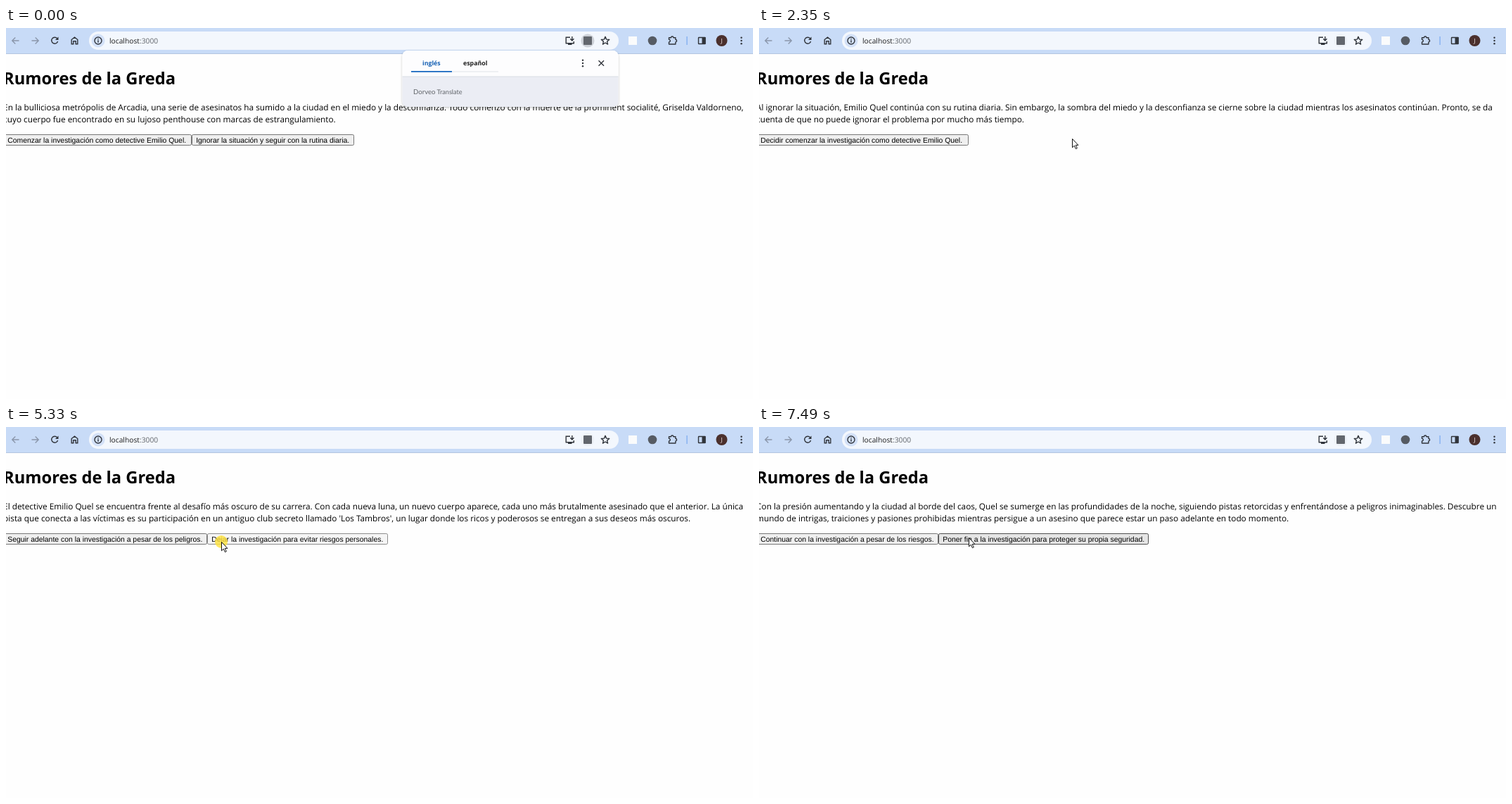
Write an HTML page that moves like this. It is 1062 px wide and 527 px high and loops after 8 s.

```html
<!DOCTYPE html>
<html lang="es">
<head>
<meta charset="utf-8">
<title>Rumores de la Greda</title>
<style>
  html, body { margin: 0; width: 100%; height: 100%; overflow: hidden; background: #fefefe; }
  svg { display: block; width: 1062px; height: 527px; }
  text { font-family: "Open Sans", "Noto Sans", sans-serif; text-rendering: geometricPrecision; }
  .h1 { font-size: 23.7px; font-weight: 700; }
  .p { font-size: 11.8px; }
  .url { font-size: 10.25px; fill: #1f1f1f; }
  .tab { font-size: 8.8px; font-weight: 700; fill: #1f1f1f; }
  .brand { font-family: Lato, sans-serif; fill: #5f6368; }
  .btn text { font-family: "Liberation Sans", Arial, sans-serif; font-size: 10.42px; }
  .btn rect { fill: #efefef; stroke: #767676; }
  .btn.hover rect { fill: #e5e5e5; stroke: #4f4f4f; }
  .btn.active rect { fill: #f5f5f5; stroke: #8d8d8d; }
  .line { fill: none; stroke: #30343b; stroke-width: 1.4; }
  .dim { stroke: #8b97ab; }
  .ink { fill: #30343b; }
</style>
</head>
<body>
<svg viewBox="0 0 1062 527">
  <defs>
    <filter id="shadow" x="-10%" y="-20%" width="120%" height="150%">
      <feDropShadow dx="0" dy="1" stdDeviation="1.6" flood-color="#3c4043" flood-opacity=".35"/>
    </filter>
    <clipPath id="card"><rect x="563.5" y="32" width="307" height="80" rx="8"/></clipPath>
  </defs>

  <rect width="1062" height="527" fill="#fefefe"/>

  <g id="page">
    <text class="h1" x="-3.9" y="80.3">Rumores de la Greda</text>
    <text class="p" id="line1" x="-3.9" y="117"></text>
    <text class="p" id="line2" x="-3.9" y="133.5"></text>
    <g class="btn"><rect y="151.5" height="15" rx="1.8"/><text y="162.7"></text></g>
    <g class="btn"><rect y="151.5" height="15" rx="1.8"/><text y="162.7"></text></g>
  </g>

  <g id="toolbar">
    <rect width="1062" height="36" fill="#c8dbf7"/>
    <rect y="36" width="1062" height="1" fill="#b3c5e0"/>
    <rect x="118" y="5" width="753" height="26" rx="13" fill="#f3f7fd"/>
    <path class="line dim" d="M18.5 18H9M13.3 13.5L8.8 18L13.3 22.5"/>
    <path class="line dim" d="M36.500 18H46M41.700 13.500L46.200 18L41.700 22.500"/>
    <path class="line" d="M72.700 14.800A4.500 4.500 0 1 0 73.600 19"/>
    <path class="ink" d="M74.500 12.500V17H70Z"/>
    <path class="line" d="M93.200 22.700V16.500L97.500 13.200L101.800 16.500V22.700H99.200V18.800H95.800V22.700Z"/>
    <circle cx="131" cy="18" r="9.500" fill="#d3e1f8"/>
    <circle class="line" cx="131" cy="18" r="5"/>
    <path class="line" d="M131 17.300V20.800M131 15V16.300"/>
    <text class="url" x="147" y="21.800">localhost<tspan fill="#5f6368">:3000</tspan></text>

    <path class="line" d="M802 13.200H796.200V21.700H807.300V19M799 23.200H804.500M804.800 12V17.500M802.200 15.300L804.800 17.900L807.400 15.300"/>
    <circle id="chip" cx="827" cy="18" r="9.500" fill="#cdd1d8"/>
    <rect x="821" y="12" width="12" height="12" rx="1" fill="#62666d"/>
    <path class="line" id="star" stroke-linejoin="round"/>
    <rect x="885" y="12" width="12" height="12" fill="#fafbfc"/>
    <circle cx="919" cy="18" r="6.300" fill="#565b63"/>
    <path class="line" stroke-linejoin="round" d="M942.500 13.700H945.500A1.700 1.700 0 0 1 948.900 13.700H951.900V16.500A1.700 1.700 0 0 1 951.900 19.900V23H942.500V20A1.800 1.800 0 0 0 942.500 16.400Z"/>
    <rect x="967.500" y="12" width="1.200" height="12" fill="#78aaf0"/>
    <rect class="line" x="984.500" y="13.500" width="9.500" height="9" rx=".5"/>
    <rect class="ink" x="989.500" y="13" width="5" height="10"/>
    <circle cx="1017.500" cy="18" r="8" fill="#4b302d"/>
    <text x="1017.500" y="21" font-size="8.500" fill="#eee5e2" text-anchor="middle">J</text>
    <g class="ink"><circle cx="1045.500" cy="13.700" r="1.200"/><circle cx="1045.500" cy="18" r="1.200"/><circle cx="1045.500" cy="22.300" r="1.200"/></g>
  </g>

  <g id="popup">
    <rect x="563.5" y="32" width="307" height="80" rx="8" fill="#fff" filter="url(#shadow)"/>
    <g clip-path="url(#card)">
      <rect x="563" y="32" width="308" height="37" fill="#fdfdfe"/>
      <rect x="563" y="69" width="308" height="43" fill="#ebedf4"/>
      <rect x="563" y="68.500" width="308" height="1" fill="#d9dde5"/>
    </g>
    <rect x="634" y="61.500" width="66" height="1" fill="#dfe3ea"/>
    <rect x="576" y="61" width="58" height="1.800" fill="#1b6ac0"/>
    <text class="tab" x="592" y="53" style="fill:#1460b4">inglés</text>
    <text class="tab" x="650" y="53">español</text>
    <g class="ink"><circle cx="820" cy="45.800" r="1.200"/><circle cx="820" cy="50" r="1.200"/><circle cx="820" cy="54.200" r="1.200"/></g>
    <path class="line" d="M842.500 46.200L850 53.700M850 46.200L842.500 53.700"/>
    <text class="brand" x="579" y="93.500" font-size="9.600">Dorveo</text>
    <text class="brand" x="612.500" y="93.500" font-size="9.200">Translate</text>
  </g>

  <circle id="halo" r="9" fill="#ffe23c" fill-opacity=".8"/>
  <path id="cursor" fill="#fff" stroke="#111" stroke-width="1" stroke-linejoin="round"
        d="M.5 .5V12.800L3.300 10.200L5.400 14.700L7.300 13.800L5.200 9.400H8.900Z"/>
</svg>

<script>
const LOOP = 8000, PRESS = 70;

// start time, two text lines, buttons as [label, right edge]
const scenes = [
  { at: 0,
    lines: ["En la bulliciosa metrópolis de Arcadia, una serie de asesinatos ha sumido a la ciudad en el miedo y la desconfianza. Todo comenzó con la muerte de la prominent socialité, Griselda Valdorneno,",
            "cuyo cuerpo fue encontrado en su lujoso penthouse con marcas de estrangulamiento."],
    buttons: [["Comenzar la investigación como detective Emilio Quel.", 264], ["Ignorar la situación y seguir con la rutina diaria.", 495]] },
  { at: 1990,
    lines: ["Al ignorar la situación, Emilio Quel continúa con su rutina diaria. Sin embargo, la sombra del miedo y la desconfianza se cierne sobre la ciudad mientras los asesinatos continúan. Pronto, se da",
            "cuenta de que no puede ignorar el problema por mucho más tiempo."],
    buttons: [["Decidir comenzar la investigación como detective Emilio Quel.", 298]] },
  { at: 3600,
    lines: ["El detective Emilio Quel se encuentra frente al desafío más oscuro de su carrera. Con cada nueva luna, un nuevo cuerpo aparece, cada uno más brutalmente asesinado que el anterior. La única",
            "pista que conecta a las víctimas es su participación en un antiguo club secreto llamado 'Los Tambros', un lugar donde los ricos y poderosos se entregan a sus deseos más oscuros."],
    buttons: [["Seguir adelante con la investigación a pesar de los peligros.", 286], ["Dejar la investigación para evitar riesgos personales.", 543]] },
  { at: 5400,
    lines: ["Al optar por alejarse de la investigación, Emilio Quel elige poner su seguridad por encima de la búsqueda de la verdad. Sin embargo, el peso de la culpa y la responsabilidad lo persigue mientras",
            "los asesinatos continúan y la ciudad se sumerge más profundamente en la oscuridad."],
    buttons: [["Volver a la investigación y enfrentar los peligros.", 231]] },
  { at: 6750,
    lines: ["Con la presión aumentando y la ciudad al borde del caos, Quel se sumerge en las profundidades de la noche, siguiendo pistas retorcidas y enfrentándose a peligros inimaginables. Descubre un",
            "mundo de intrigas, traiciones y pasiones prohibidas mientras persigue a un asesino que parece estar un paso adelante en todo momento."],
    buttons: [["Continuar con la investigación a pesar de los riesgos.", 255], ["Poner fin a la investigación para proteger su propia seguridad.", 554]] }
];

// pointer moves: first step, last step, step count, destination
const start = [1158, 616];
const moves = [
  [110, 590, 8, 539, 171],
  [790, 790, 1, 538, 170],
  [1450, 1450, 1, 493, 170],
  [1520, 1720, 4, 451, 157],
  [2350, 2350, 1, 445, 157],
  [2420, 2940, 9, 250, 157],
  [4000, 4070, 2, 306, 163],
  [5670, 6150, 8, 207, 157],
  [7080, 7490, 7, 298, 157]
];

const $ = id => document.getElementById(id);
const buttons = [...document.querySelectorAll(".btn")];
const easeOut = p => 1 - (1 - p) ** 2;

$("star").setAttribute("d", "M" + Array.from({ length: 10 }, (_, i) => {
  const r = i % 2 ? 2.7 : 6, a = i * Math.PI / 5;
  return (852 + r * Math.sin(a)).toFixed(2) + " " + (18.3 - r * Math.cos(a)).toFixed(2);
}).join("L") + "Z");

function pointer(t) {
  let [x, y] = start;
  for (const [from, to, n, tx, ty] of moves) {
    if (t < from) break;
    const gap = (to - from) / (n - 1) || 1;
    const step = t >= to ? n : Math.floor((t - from) / gap) + 1;
    const p = easeOut(step / n);
    x += (tx - x) * p;
    y += (ty - y) * p;
  }
  return [Math.round(x), Math.round(y)];
}

let shown;
function showScene(scene) {
  if (scene === shown) return;
  shown = scene;
  $("line1").textContent = scene.lines[0];
  $("line2").textContent = scene.lines[1];
  let left = -4;
  buttons.forEach((b, i) => {
    const spec = scene.buttons[i];
    b.style.display = spec ? "" : "none";
    if (!spec) return;
    const [box, label] = b.children;
    box.setAttribute("x", left + .5);
    box.setAttribute("width", spec[1] - left - 1);
    label.setAttribute("x", left + 6.2);
    label.textContent = spec[0];
    left = spec[1];
  });
}

function render(t) {
  const scene = scenes.findLast(s => t >= s.at);
  showScene(scene);

  const [x, y] = pointer(t);
  const pressed = scenes.some(s => s.at && t >= s.at - PRESS && t < s.at);
  let left = -4;
  buttons.forEach((b, i) => {
    const right = scene.buttons[i] ? scene.buttons[i][1] : left;
    const over = x >= left && x < right && y >= 151 && y < 167;
    b.classList.toggle("hover", over && !pressed);
    b.classList.toggle("active", over && pressed);
    left = right;
  });

  const place = `translate(${x} ${y})`;
  $("cursor").setAttribute("transform", place);
  $("halo").setAttribute("transform", place);
  $("halo").style.display = pressed ? "" : "none";

  const fade = t < 1990 ? 1 : Math.max(0, 1 - (Math.floor((t - 1990) / 73) + 1) / 4);
  $("popup").style.opacity = fade;
  $("chip").style.opacity = .15 + .85 * fade;
}

const t0 = performance.now();
function tick() {
  render((performance.now() - t0) % LOOP);
  requestAnimationFrame(tick);
}
tick();
</script>
</body>
</html>
```
